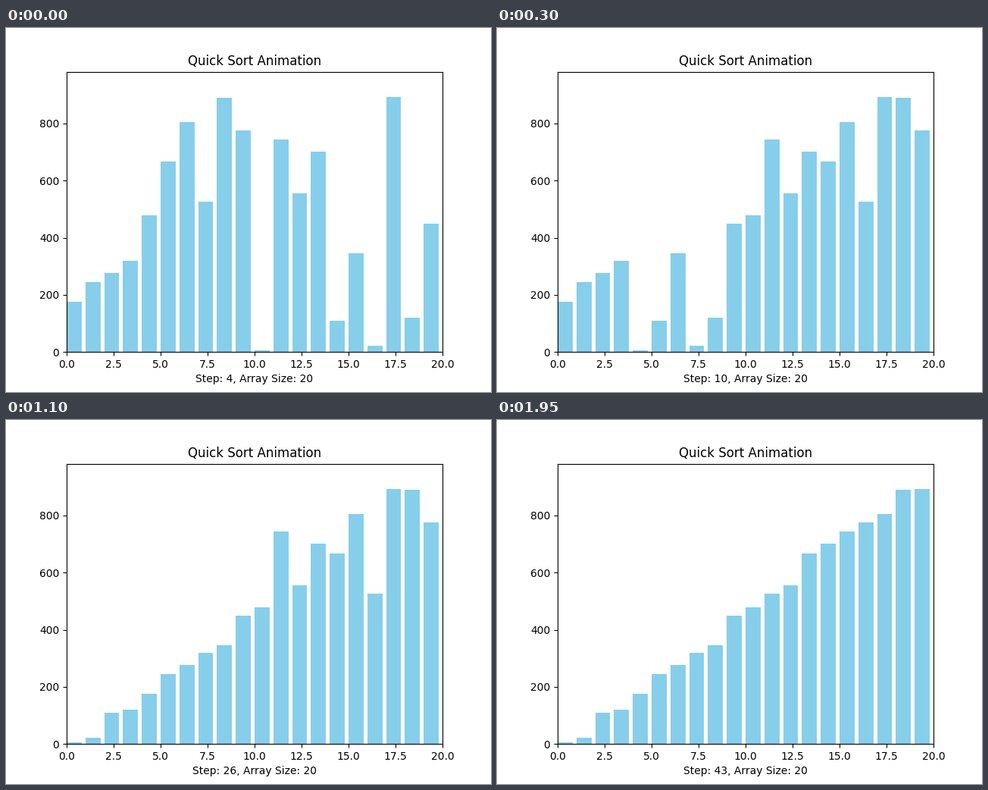
A matplotlib script that plays this animation: 640x480 px, repeating every 8000 ms.

```python
import matplotlib.pyplot as plt
from matplotlib.animation import FuncAnimation

VALUES = [175, 245, 277, 318, 478, 667, 805, 525, 890, 775,
          5, 743, 555, 701, 109, 345, 21, 892, 120, 449]
FIRST_STEP = 4
INTERVAL = 50
FRAMES = 160


def quick_sort(a, low, high):
    """Sort in place (last item as pivot), yielding a copy after every swap."""
    if low >= high:
        return
    pivot, i = a[high], low
    for j in range(low, high):
        if a[j] < pivot:
            a[i], a[j] = a[j], a[i]
            i += 1
            yield a[:]
    a[i], a[high] = a[high], a[i]
    yield a[:]
    yield from quick_sort(a, low, i - 1)
    yield from quick_sort(a, i + 1, high)


n = len(VALUES)
states = list(quick_sort(VALUES[:], 0, n - 1))

fig, ax = plt.subplots(figsize=(6.4, 4.8), dpi=100)
bars = ax.bar(range(n), VALUES, align="edge", color="skyblue")
ax.set_xlim(0, n)
ax.set_ylim(0, 1.1 * max(VALUES))
ax.set_title("Quick Sort Animation")
label = ax.set_xlabel("")


def update(frame):
    step = min(FIRST_STEP + frame, len(states))
    for bar, height in zip(bars, states[step - 1]):
        bar.set_height(height)
    label.set_text(f"Step: {step}, Array Size: {n}")
    return [*bars, label]


anim = FuncAnimation(fig, update, frames=FRAMES, interval=INTERVAL,
                     repeat=True, repeat_delay=0, blit=False)
plt.show()
```
